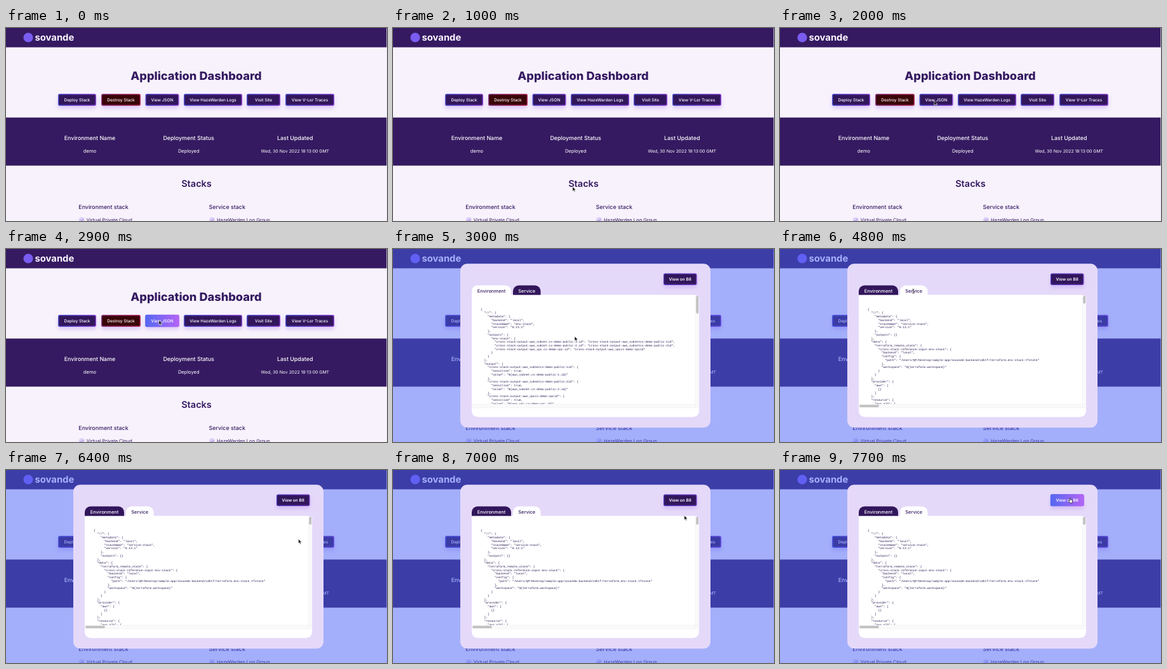
An HTML page for the animation above (7.8 s loop, 600 by 305 pixels).

```html
<!DOCTYPE html>
<html lang="en">
<head>
<meta charset="utf-8">
<title>Application Dashboard</title>
<style>
  html, body { margin: 0; width: 100%; height: 100%; overflow: hidden; background: #f7f2fc; }
  svg { display: block; width: 100vw; height: 100vh; font-family: Inter, "Open Sans", sans-serif; text-rendering: geometricPrecision; }
  .code { font-family: "Liberation Mono", "DejaVu Sans Mono", monospace; font-size: 4.6px; fill: #24124f; white-space: pre; }
</style>
</head>
<body>
<svg id="stage" viewBox="0 0 600 305" xmlns="http://www.w3.org/2000/svg">
  <defs>
    <linearGradient id="glow"><stop stop-color="#5468f1"/><stop offset="1" stop-color="#b564f5"/></linearGradient>
    <linearGradient id="edge"><stop stop-color="#4b50d0"/><stop offset="1" stop-color="#9047d8"/></linearGradient>
    <linearGradient id="deepEdge"><stop stop-color="#4634b4"/><stop offset="1" stop-color="#6a35b8"/></linearGradient>
    <linearGradient id="danger"><stop stop-color="#8c3a86"/><stop offset="1" stop-color="#bd3260"/></linearGradient>
    <filter id="blur" x="-30%" y="-60%" width="160%" height="240%"><feGaussianBlur stdDeviation="3"/></filter>
    <clipPath id="codeClip"><rect x="124" y="73" width="352" height="172"/></clipPath>
  </defs>
  <g id="page"></g>
  <g id="modal"></g>
  <g id="cursor"></g>
</svg>
<script>
const LOOP = 7800, STEP = 100;
const DARK = '#351a61', WHITE = '#fff';
const $ = id => document.getElementById(id);

const rect = (x, y, w, h, fill, extra = '') =>
  `<rect x="${x}" y="${y}" width="${w}" height="${h}" fill="${fill}" ${extra}/>`;

const label = (text, x, y, size, fill, weight = 500, anchor = 'middle') =>
  `<text x="${x}" y="${y}" font-size="${size}" font-weight="${weight}" fill="${fill}" text-anchor="${anchor}">${text}</text>`;

function button(text, x, y, w, h, { id, edge = 'edge', fill = '#32165c', weight = 500 } = {}) {
  const hover = id ? rect(x - .2, y - .2, w + .4, h + .4, 'url(#glow)', `id="${id}" rx="2.5" opacity="0"`) : '';
  return rect(x, y + 4, w, h, '#b78ef0', 'rx="3" opacity=".42" filter="url(#blur)"') +
    rect(x + .7, y + .7, w - 1.4, h - 1.4, fill, `rx="2" stroke="url(#${edge})" stroke-width="1.4"`) +
    hover + label(text, x + w / 2, y + h / 2 + 2.3, 6.5, WHITE, weight);
}

const fact = (title, value, x, size) =>
  label(title, x, 177, 8.9, WHITE) + label(value, x, 196.8, size, WHITE, 400);

const stackColumn = (title, item, x) =>
  label(title, x, 286.2, 8.85, DARK, 500, 'start') +
  `<circle cx="${x + 5}" cy="303.6" r="4.6" fill="#dccff6"/>
   <path d="M${x + 2.8} 303.6l1.7 1.8 3-3.6" fill="none" stroke="#8f78cc" stroke-width=".9"/>` +
  label(item, x + 12.5, 306.4, 7.45, DARK, 400, 'start');

$('page').innerHTML =
  rect(0, 0, 600, 305, '#f7f2fc') + rect(0, 0, 600, 30.5, DARK) +
  '<circle cx="35" cy="15" r="7.6" fill="#7a5cf0"/>' +
  label('sovande', 45.5, 20, 14.8, '#fbf4ff', 700, 'start') +
  label('Application Dashboard', 299.5, 82, 18.2, DARK, 800) +
  button('Deploy Stack', 82, 104, 60, 19) +
  button('Destroy Stack', 150, 104, 62, 19, { edge: 'danger', fill: '#3a0508' }) +
  button('View JSON', 219.5, 104, 53, 19, { id: 'jsonHover' }) +
  button('View HazeWarden Logs', 280, 104, 92, 19) +
  button('Visit Site', 379, 104, 53, 19) +
  button('View V-Lor Traces', 440, 104, 77, 19) +
  rect(0, 141.5, 600, 76, DARK) +
  fact('Environment Name', 'demo', 132, 7.6) +
  fact('Deployment Status', 'Deployed', 287.7, 7.5) +
  fact('Last Updated', 'Wed, 30 Nov 2022 18:13:00 GMT', 455.3, 6.9) +
  label('Stacks', 300, 251, 14.5, DARK, 600) +
  stackColumn('Environment stack', 'Virtual Private Cloud', 114.3) +
  stackColumn('Service stack', 'HazeWarden Log Group', 319.5) +
  rect(599.3, 0, .7, 305, '#e9e4f0');

const crossOutput = (name, ref) => `    "cross-stack-output-aws_${name}": {
      "sensitive": true,
      "value": "\${aws_${ref}}"
    },`;

const header = stack => `{
  "//": {
    "metadata": {
      "backend": "local",
      "stackName": "${stack}",
      "version": "0.13.1"
    },`;

const environmentJson = `${header('env-stack')}
    "outputs": {
      "env-stack": {
        "cross-stack-output-aws_subnet.cs-demo-public-1.id": "cross-stack-output-aws_subnetcs-demo-public-1id",
        "cross-stack-output-aws_subnet.cs-demo-public-2.id": "cross-stack-output-aws_subnetcs-demo-public-2id",
        "cross-stack-output-aws_vpc.cs-demo-vpc.id": "cross-stack-output-aws_vpccs-demo-vpcid"
      }
    }
  },
  "output": {
${crossOutput('subnetcs-demo-public-1id', 'subnet.cs-demo-public-1.id')}
${crossOutput('subnetcs-demo-public-2id', 'subnet.cs-demo-public-2.id')}
${crossOutput('vpccs-demo-vpcid', 'vpc.cs-demo-vpc.id')}`;

const serviceJson = `${header('service-stack')}
    "outputs": {}
  },
  "data": {
    "terraform_remote_state": {
      "cross-stack-reference-input-env-stack": {
        "backend": "local",
        "config": {
          "path": "/Users/QP/Desktop/sample-app/sovande-backend/cdktf/terraform.env-stack.tfstate"
        },
        "workspace": "\${terraform.workspace}"
      }
    }
  },
  "provider": {
    "aws": [
      {}
    ]
  },
  "resource": {
    "aws_alb": {`;

const codeBlock = source => source.split('\n').map((line, i) => {
  const indent = line.search(/\S/);
  return `<text class="code" x="${138 + indent * 2.76}" y="${96.6 + i * 5.74}">${line.trim()}</text>`;
}).join('');

const tab = (text, x, w, active) =>
  `<path d="M${x} 73V66.5a9 9 0 0 1 9-9h${w - 18}a9 9 0 0 1 9 9V73z" fill="${active ? WHITE : '#32165c'}"/>` +
  label(text, x + w / 2, 69.3, 7.4, active ? DARK : WHITE);

const view = (id, serviceActive, source, thumb, extra = '') =>
  `<g id="${id}">${tab('Environment', 124, 62, !serviceActive)}${tab('Service', 189, 43.5, serviceActive)}
   ${rect(124, 72.6, 110, 1, WHITE)}
   <g clip-path="url(#codeClip)">${codeBlock(source)}</g>
   ${rect(477.3, 74, 3.8, thumb, '#c1c1c1', 'rx="1.9"')}${extra}</g>`;

$('modal').innerHTML =
  rect(0, 0, 600, 305, '#4663f7', 'opacity=".475"') +
  rect(106, 23.2, 394, 259, '#e5d9f9', 'rx="11"') +
  button('View on B8', 426, 38.5, 52.5, 18.5, { id: 'openHover', edge: 'deepEdge', weight: 600 }) +
  '<path d="M124 72.6H474q8 0 8 8V254.5q0 11-11 11H135q-11 0-11-11z" fill="#fff"/>' +
  rect(476, 76, 6, 169, '#fafafa') + rect(124, 245, 358, 6, '#fafafa') +
  '<path d="M476.2 73V251M124 245.2H482M124 251H482" stroke="#e8e8e8" stroke-width=".5"/>' +
  view('environment', false, environmentJson, 28) +
  view('service', true, serviceJson, 12.5, rect(125, 246.3, 31, 3.6, '#c1c1c1', 'rx="1.8"'));

const pointers = {
  arrow: '<path d="M0 0V7.2L1.7 5.7 2.9 8.4 4.1 7.9 2.9 5.3H5.2z" fill="#111" stroke="#fff" stroke-width=".6"/>',
  beam: '<path d="M-1.5-3.5Q0-3.5 0-2.4Q0-3.5 1.5-3.5M0-2.6V2.6M-1.5 3.5Q0 3.5 0 2.4Q0 3.5 1.5 3.5" fill="none" stroke="#222" stroke-width=".8"/>',
  hand: '<path d="M-1.3-3q.7-1 1.4 0v2.5l2.4.5q1 .3.8 1.4L2.8 4.5h-3.6L-3 1.6q-.3-1 .7-.8l1 .7z" fill="#fff" stroke="#111" stroke-width=".7"/>'
};
$('cursor').innerHTML = Object.entries(pointers).map(([id, shape]) => `<g id="${id}">${shape}</g>`).join('');

// time, x, y
const path = [
  [600, 300, 309], [1700, 242.8, 115], [2200, 242.8, 115], [2600, 240.8, 112.5], [2900, 240.8, 112.5],
  [3000, 286, 138], [3500, 286, 138], [4400, 210, 66.8], [5300, 210, 66.8],
  [6200, 460.5, 109], [6600, 460.5, 109], [7300, 457.5, 47.5], [LOOP, 457.5, 47.5]
];
const clamp = v => Math.min(1, Math.max(0, v));
const ease = v => v * v * (3 - 2 * v);

function cursorAt(t) {
  const i = Math.max(1, path.findIndex(p => p[0] >= t));
  const [t0, x0, y0] = path[i - 1], [t1, x1, y1] = path[i];
  const k = ease(clamp((t - t0) / (t1 - t0)));
  return [x0 + (x1 - x0) * k, y0 + (y1 - y0) * k];
}

const show = (id, on) => $(id).setAttribute('visibility', on ? 'visible' : 'hidden');

function render(time) {
  const t = Math.floor((time % LOOP) / STEP) * STEP;
  const modal = t >= 3000, service = modal && t >= 4600;
  const [x, y] = cursorAt(t);
  const pointer = t >= 4300 && t < 5500 ? 'beam' : t >= 7200 ? 'hand' : 'arrow';
  $('jsonHover').setAttribute('opacity', modal ? 0 : clamp((t - 2000) / 300));
  $('openHover').setAttribute('opacity', clamp((t - 7100) / 300));
  $('modal').setAttribute('display', modal ? 'inline' : 'none');
  show('environment', !service);
  show('service', service);
  for (const id in pointers) show(id, t >= 700 && id === pointer);
  $('cursor').setAttribute('transform', `translate(${x} ${y})`);
}

const start = performance.now();
function tick() {
  render(performance.now() - start);
  requestAnimationFrame(tick);
}
tick();
</script>
</body>
</html>
```
